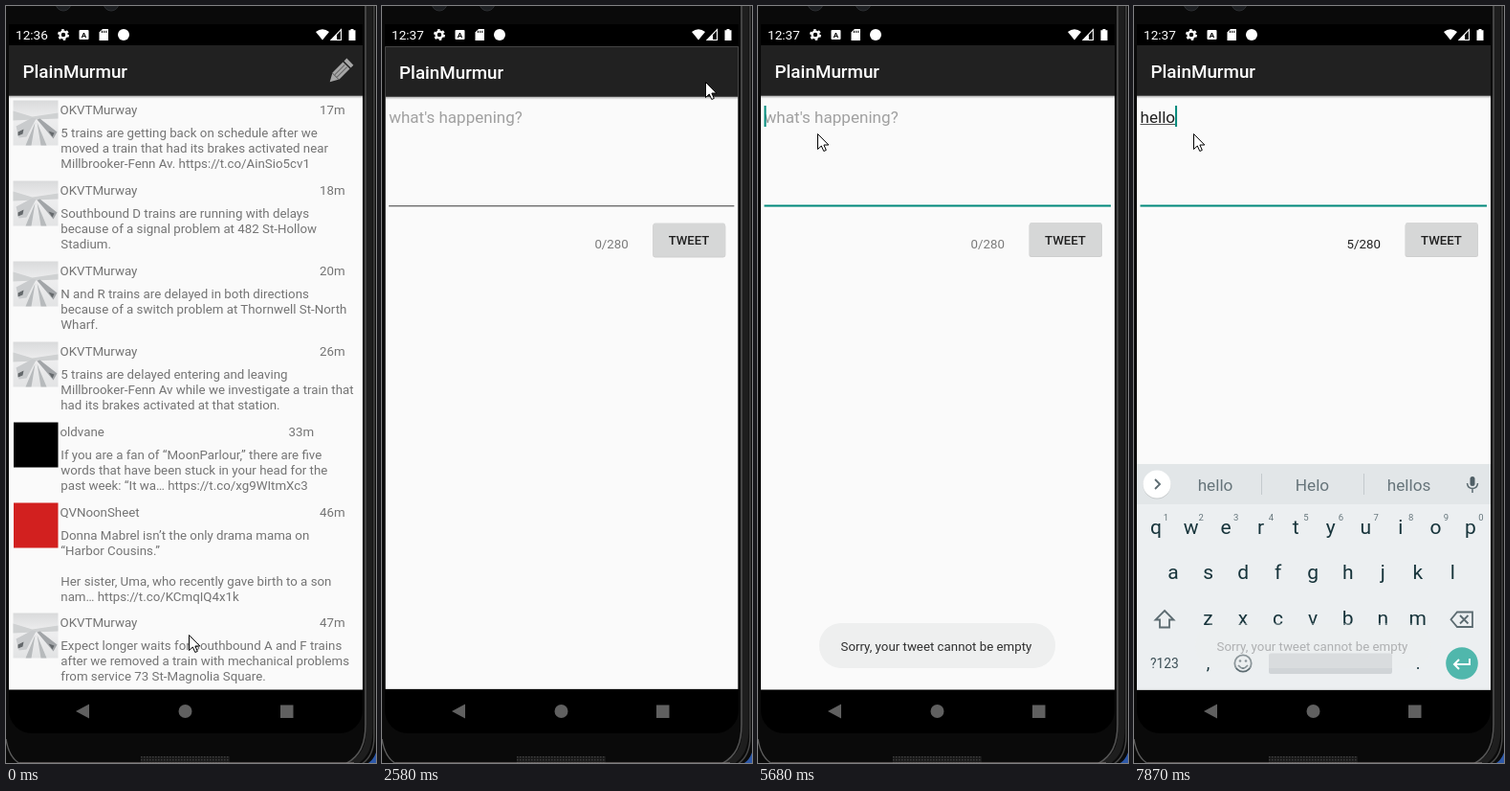
These frames come from a looping animation (387 px wide and 790 px high, 8 s). An HTML page:

```html
<!DOCTYPE html>
<html lang="en">
<head>
<meta charset="utf-8">
<title>Compose demo</title>
<style>
  html, body { margin: 0; width: 100%; height: 100%; overflow: hidden; background: #0a0a0a; }
  svg { display: block; width: 387px; height: 790px; font-family: Roboto, sans-serif; }
  text { white-space: pre; }
  .body { font-size: 13.3px; fill: #747474; }
  .field { font-size: 17.1px; }
  .mid { text-anchor: middle; }
  .key { font-size: 21px; fill: #17343b; text-anchor: middle; }
  .sup { font-size: 9.5px; fill: #66767c; text-anchor: middle; }
  .word { font-size: 17.2px; fill: #66747a; text-anchor: middle; }
  .line { fill: none; stroke: #5c6b71; stroke-width: 1.8; }
</style>
</head>
<body>
<svg viewBox="0 0 387 790">
  <defs>
    <linearGradient id="snow" x2="0" y2="1">
      <stop offset="0" stop-color="#d9dadb"/><stop offset=".4" stop-color="#eeeeef"/><stop offset="1" stop-color="#e2e3e4"/>
    </linearGradient>
    <linearGradient id="shade" x2="0" y2="1">
      <stop offset="0" stop-opacity=".28"/><stop offset="1" stop-opacity="0"/>
    </linearGradient>
    <pattern id="grille" width="3" height="3" patternUnits="userSpaceOnUse">
      <rect width="3" height="3" fill="#171717"/><rect width="1.5" height="1.5" fill="#3c3c3c"/>
    </pattern>
    <clipPath id="stage"><rect x="3" y="41" width="370" height="672.5"/></clipPath>
    <g id="photo">
      <rect width="47" height="47" fill="url(#snow)"/>
      <path d="M0 11L20 17 47 13V19L22 20 0 21Z" fill="#cfd1d2"/>
      <path d="M3 27L20 18 24 19 14 38 6 39Z" fill="#c9cbcd"/>
      <path d="M25 20L28 19 46 33 42 40Z" fill="#a2a5a8"/>
      <path d="M5 33L11 30 10 35 5 37ZM37 32L43 34 41 38Z" fill="#64686b"/>
      <path d="M13 47L23 23 19 47ZM29 47L25 23 35 47Z" fill="#b7babc"/>
    </g>
  </defs>

  <!-- phone body -->
  <rect width="387" height="790" fill="#0a0a0a"/>
  <circle cx="60" cy="-3" r="8" fill="#1d1f22" stroke="#2c2e31"/>
  <circle cx="110" cy="-3" r="8" fill="#1d1f22" stroke="#2c2e31"/>
  <path d="M3 19H373V735A24 24 0 0 1 349 759H27A24 24 0 0 1 3 735Z"/>
  <g fill="none">
    <path d="M380 0V754C380 775 374 785 361 791" stroke="#1e1e1e" stroke-width="7"/>
    <path d="M376 0V750C376 771 370 783 355 791" stroke="#555" stroke-width="1.5"/>
    <path d="M385 0V762C385 777 380 786 372 791" stroke="#474747" stroke-width="1.5"/>
    <path d="M0 765C2 778 6 786 15 791" stroke="#5c5c5c" stroke-width="1.4"/>
  </g>
  <path d="M387 779V790H379Q384 787 387 779Z" fill="#2d58a8"/>
  <rect x="141" y="783" width="93" height="7" fill="url(#grille)"/>
  <rect x="14" y="789.3" width="350" height=".7" fill="#77706f"/>

  <!-- status bar -->
  <g fill="#fff">
    <text id="clock" x="10" y="35" font-size="13.6"></text>
    <circle cx="60" cy="30" r="3.4" fill="none" stroke="#fff" stroke-width="2.4"/>
    <circle cx="60" cy="30" r="5" fill="none" stroke="#fff" stroke-width="2" stroke-dasharray="2.6 2.64"/>
    <rect x="76.5" y="25" width="10" height="10" rx="1"/>
    <text class="mid" x="81.5" y="33" font-size="8" font-weight="700" style="fill:#000">A</text>
    <path d="M101 24H107V36H97.5V27.5Z"/>
    <path d="M100.5 28V25.8M102.7 28V25.8M104.9 28V25.8" stroke="#000"/>
    <circle cx="123" cy="30" r="6"/>
    <path d="M324 27Q331 21.5 338 27L331 35.5Z"/>
    <path d="M350.5 24.5V35.5H340Z" fill="none" stroke="#fff" stroke-width="1.1"/>
    <path d="M346 29.5V35.5H340Z"/>
    <path d="M360.5 24H363.5V25.3H365.5V36H358.5V25.3H360.5Z"/>
  </g>
  <g fill="#606060">
    <path d="M87 728.5V743.5L73 736Z"/>
    <circle cx="187.5" cy="736" r="7"/>
    <rect x="287" y="729.5" width="13.5" height="13.5"/>
  </g>

  <g clip-path="url(#stage)">
    <g id="feed"></g>
    <g id="compose"></g>
  </g>
  <g id="keyboard"></g>
  <g id="toast">
    <rect x="64" y="644" width="247" height="47" rx="23" fill="#eeefef"/>
    <text x="86.5" y="673" font-size="13.3" fill="#303030">Sorry, your tweet cannot be empty</text>
  </g>
  <path id="cursor" d="M.5 .5V16.5L4.3 13 6.8 18.5 9.3 17.4 6.9 12H11.8Z" fill="#fff" stroke="#000"/>
</svg>

<script>
const LOOP = 8000;
const $ = id => document.getElementById(id);
const text = (x, y, s, cls, extra = '') => `<text x="${x}" y="${y}" class="${cls}" ${extra}>${s}</text>`;

// --- pages -------------------------------------------------------------
const bar = `
  <rect x="3" y="41" width="370" height="673" fill="#fafafa"/>
  <rect x="3" y="41" width="370" height="52.75" fill="#212121"/>
  <rect x="3" y="93.75" width="370" height="3" fill="url(#shade)"/>
  ${text(17.5, 75.3, 'PlainMurmur', '', 'font-size="18.85" font-weight="500" fill="#fff"')}`;

const metro = 'OKVTMurway';
const posts = [
  [108, metro, '17m', '5 trains are getting back on schedule after we|moved a train that had its brakes activated near|Millbrooker-Fenn Av. https://t.co/AinSio5cv1'],
  [192, metro, '18m', 'Southbound D trains are running with delays|because of a signal problem at 482 St-Hollow|Stadium.'],
  [276, metro, '20m', 'N and R trains are delayed in both directions|because of a switch problem at Thornwell St-North|Wharf.'],
  [360, metro, '26m', '5 trains are delayed entering and leaving|Millbrooker-Fenn Av while we investigate a train that|had its brakes activated at that station.'],
  [444, 'oldvane', '33m', 'If you are a fan of “MoonParlour,” there are five|words that have been stuck in your head for the|past week: “It wa… https://t.co/xg9WItmXc3', '#000'],
  [528, 'QVNoonSheet', '46m', 'Donna Mabrel isn’t the only drama mama on|“Harbor Cousins.”||Her sister, Uma, who recently gave birth to a son|nam… https://t.co/KCmqIQ4x1k', '#d2201f'],
  [643, metro, '47m', 'Expect longer waits for southbound A and F trains|after we removed a train with mechanical problems|from service 73 St-Magnolia Square.']
];

const post = ([y, name, age, body, logo]) =>
  (logo ? `<rect x="8" y="${y - 9.5}" width="46.5" height="47" fill="${logo}"/>`
        : `<use href="#photo" x="7.5" y="${y - 9.5}"/>`) +
  text(56.5, y + 5, name, 'body') +
  text(age === '33m' ? 295.5 : 328, y + 5, age, 'body') +
  body.split('|').map((s, i) => text(57.3, y + 29 + i * 16, s, 'body')).join('');

$('feed').innerHTML = bar + `
  <circle id="ripple" cx="349.5" cy="67.5" fill="#fff"/>
  <g transform="translate(350 68) rotate(45)">
    <path d="M-5 -14H5V-10H-5ZM-5 -8.5H5V7L0 16 -5 7Z" fill="#a6a6a6"/>
    <path d="M-1.7 -8V7M1.7 -8V7M-5 7.5H5" stroke="#4a4a4a" stroke-width=".9"/>
  </g>` + posts.map(post).join('');

$('compose').innerHTML = bar +
  text(6.5, 121.5, '', 'field', 'id="entry"') + `
  <rect id="spell" x="6.5" y="123" height="1" fill="#555"/>
  <rect id="caret" y="104" width="2" height="22" fill="#00897b"/>
  <rect id="rule" x="6.5" width="362.5"/>
  ${text(222.5, 253, '', '', 'id="count" font-size="13.3"')}
  <rect x="283.5" y="227" width="76.5" height="35" rx="2.5" opacity=".18"/>
  <rect id="button" x="284" y="226" width="75.5" height="35" rx="2"/>
  ${text(321.5, 248.7, 'TWEET', 'mid', 'font-size="13.2" font-weight="500" fill="#202020"')}`;

// --- keyboard ----------------------------------------------------------
const row = (keys, x, y) => [...keys].map((k, i) => text(x + i * 36.55, y, k, 'key')).join('');
const digits = [...'1234567890'].map((d, i) => text(33.5 + i * 36.6, 537, d, 'sup')).join('');

$('keyboard').innerHTML = `
  <rect x="3" y="478" width="370" height="235.7" fill="#eceff1"/>
  <rect x="3" y="478" width="370" height="42" fill="#e2e6e8"/>
  <circle cx="24" cy="500" r="14.5" opacity=".12"/>
  <circle cx="24" cy="499" r="14.5" fill="#fff"/>
  <path id="chevron" class="line"/>
  <rect x="351.5" y="491" width="5" height="10" rx="2.5" fill="#4f5e65"/>
  <path class="line" d="M348.5 498Q349 503.5 354 503.5T359.5 498M354 503.5V508" style="stroke-width:1.5"/>
  <g id="tools">
    <circle class="line" cx="72" cy="497" r="5.3"/><path class="line" d="M76 501L82 507" style="stroke-width:2.3"/>
    <path class="line" d="M121 492H134.5V501L129.5 506H121ZM129.5 506V501H134.5"/>
    <path class="line" d="M124 500Q126 503 129 500M125 495.5V497.5M130.5 495.5V497.5" style="stroke-width:1.3"/>
    ${text(180.5, 503.5, 'GIF', 'mid', 'font-size="12.5" font-weight="900" fill="#5c6b71" letter-spacing=".6"')}
    <rect x="228" y="491" width="16" height="16" fill="#74838a"/>
    <rect x="268" y="488" width="1" height="22" fill="#c4cacd"/>
    <g fill="#5c6b71"><circle cx="296" cy="499" r="2"/><circle cx="302" cy="499" r="2"/><circle cx="308" cy="499" r="2"/></g>
  </g>
  <g id="words">
    <rect x="133" y="488" width="1" height="22" fill="#c4cacd"/><rect x="240" y="488" width="1" height="22" fill="#c4cacd"/>
    ${[85, 186.5, 287.5].map(x => text(x, 506, '', 'word')).join('')}
  </g>
  ${digits}${row('qwertyuiop', 23, 551)}${row('asdfghjkl', 41, 598)}${row('zxcvbnm', 77.5, 645.5)}
  <path class="line" d="M32 631L41.5 640.5H37V648.5H27V640.5H22.5Z"/>
  <path class="line" d="M338 632.5H354V648H338L331.5 640.25ZM341 636L349.5 644.5M349.5 636L341 644.5"/>
  ${text(32, 691, '?123', 'mid', 'font-size="13.8" fill="#3c4f56"')}
  ${text(77.5, 691.5, ',', 'key', 'style="font-size:18px"')}
  <circle class="line" cx="114" cy="686" r="8.7"/>
  <path class="line" d="M109 688Q114 694 119 688"/>
  <circle cx="111" cy="683.5" r="1.3" fill="#5c6b71"/><circle cx="117" cy="683.5" r="1.3" fill="#5c6b71"/>
  <rect x="141" y="675.5" width="129" height="21.5" rx="2" fill="#d0d4d7"/>
  ${text(297, 691.5, '.', 'key', 'style="font-size:18px"')}
  <circle cx="343" cy="686" r="16.8" fill="#50b7ac"/>
  <path d="M351 681V687H335.5M340 682L335 687 340 692" fill="none" stroke="#fff" stroke-width="2"/>`;

// --- timeline: [start, value...] rows, each held until the next ---------
const pointer = [
  [0, 191, 656], [250, 206, 618], [370, 227, 561], [520, 268, 440], [640, 330, 270], [760, 361, 171],
  [910, 353, 126], [1060, 350, 100], [1180, 345, 80], [1310, 347, 71], [1450, 347, 69],
  [2460, 345, 72], [2580, 338, 79], [2730, 303, 104], [2880, 210, 155], [3010, 139, 178],
  [3160, 190, 217], [3280, 262, 250], [3400, 302, 257], [3550, 314, 250], [3670, 320, 248],
  [4220, 265, 288], [4340, 222, 317], [5010, 209, 309], [5160, 165, 265], [5280, 98, 185],
  [5400, 62, 136], [5680, 62, 133]
];
const ripple = [[0, 0, 0], [1820, 10, .1], [1940, 15, .16], [2060, 18.5, .18], [2310, 0, 0]];
const page = [[0, 1, 0], [2460, .95, .7], [2580, .9965, 1], [2730, 1, 1]];   // scale, opacity
const press = [[0, '#d6d7d7'], [3980, '#c4c5c5'], [4100, '#b4b5b5'], [4220, '#c6c7c7'], [4340, '#d6d7d7']];
const toast = [[0, 0], [4100, .08], [4220, .3], [4340, .6], [4490, .88], [4610, 1], [7600, .9], [7720, .65], [7870, .32]];
const board = [[0, null], [6390, 3.6], [6510, 1], [6630, 0]];
const caret = [[0, 0], [5680, 1], [6390, 0], [6510, 1]];
const typed = [
  [0, '', ''], [6910, 'h', 'he h have'], [7060, 'he', 'he hey here'], [7180, 'hel', 'help hel hello'],
  [7330, 'hell', 'hello hell he’ll'], [7600, 'hello', 'hello Helo hellos']
];

function at(table, t) {
  let i = table.length - 1;
  while (table[i][0] > t) i--;
  return table[i].slice(1);
}

function set(id, attrs) {
  for (const k in attrs) $(id).setAttribute(k, attrs[k]);
}

const show = (id, on) => { $(id).style.display = on ? '' : 'none'; };
const slots = [...$('words').querySelectorAll('text')];

function draw(t) {
  const [x, y] = at(pointer, t);
  set('cursor', { transform: `translate(${x} ${y})` });
  const [r, glow] = at(ripple, t);
  set('ripple', { r, opacity: glow });
  $('clock').textContent = t < 2460 ? '12:36' : '12:37';

  const [scale, alpha] = at(page, t);
  set('compose', { transform: `translate(188 390) scale(${scale}) translate(-188 -390)`, opacity: alpha });
  show('feed', alpha < 1);
  set('button', { fill: at(press, t)[0] });
  set('toast', { opacity: at(toast, t)[0] });

  const focus = t >= 5680;
  set('rule', { y: focus ? 207.5 : 207.4, height: focus ? 2 : 1.3, fill: focus ? '#00897b' : t < 2730 ? '#666' : '#949494' });

  const [word, hints] = at(typed, t);
  $('entry').textContent = word || "what's happening?";
  set('entry', { fill: word ? '#212121' : '#a0a0a0' });
  const width = word ? $('entry').getComputedTextLength() : 0;
  set('spell', { width });
  set('caret', { x: 6.5 + width, opacity: at(caret, t)[0] });
  $('count').textContent = word.length + '/280';
  set('count', { fill: word ? '#222' : '#7b7b7b' });

  const [drop] = at(board, t);
  show('keyboard', drop !== null);
  set('keyboard', { transform: `translate(0 ${drop || 0})` });
  show('tools', !word);
  show('words', word);
  set('chevron', { d: word ? 'M22 494L27 499 22 504' : 'M26.5 494L21.5 499 26.5 504' });
  hints.split(' ').forEach((s, i) => { slots[i].textContent = s; });
}

const start = performance.now();
function tick(now) {
  draw(Math.max(0, now - start) % LOOP);
  requestAnimationFrame(tick);
}
tick(start);
</script>
</body>
</html>
```
